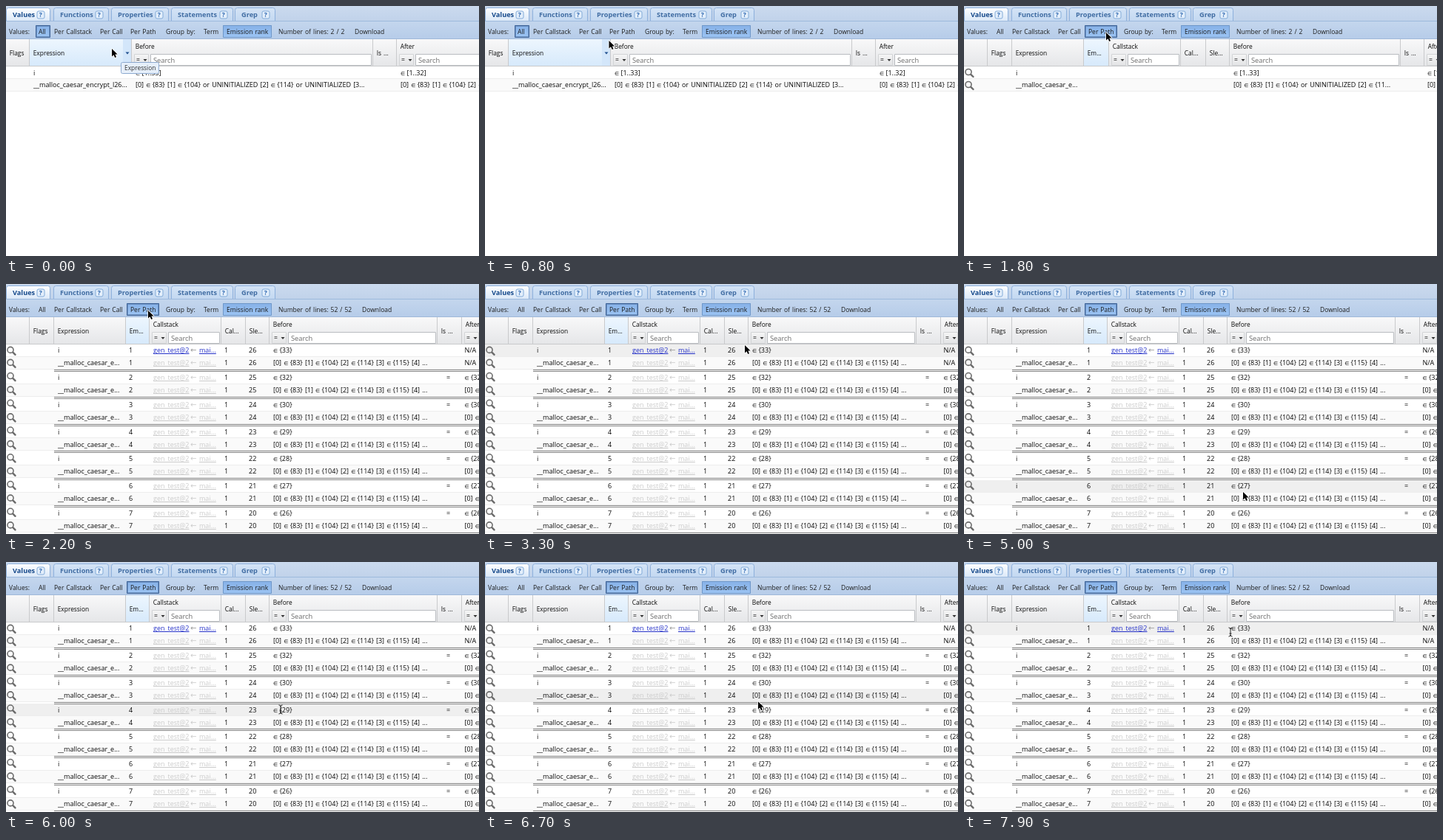
These frames come from a looping animation (639x339 px, 8000 ms). An HTML page with a canvas:

```html
<!DOCTYPE html>
<html lang="en">
<head>
<meta charset="utf-8">
<title>Values table</title>
<style>
html, body { margin: 0; width: 100%; height: 100%; overflow: hidden; background: #fff; }
canvas { display: block; }
</style>
</head>
<body>
<canvas id="stage" width="639" height="339"></canvas>
<script>
const W = 639, H = 339, LOOP = 8000;
const SWITCH = 1400, LOADED = 2000;
const ctx = document.getElementById('stage').getContext('2d');
const SANS = '"Open Sans", "Noto Sans", sans-serif';
const SYMBOLS = { '∈': 7, '←': 10 };

// Columns: left edge, label, has a filter field
const START = [[0, 'Flags'], [32, 'Expression'], [170, 'Before', 1], [496, 'Is ...'], [528, 'After', 1]];
const WAITING = [[0, ''], [32, 'Flags'], [65, 'Expression'], [162, 'Em...'], [196, 'Callstack', 1],
  [293, 'Cal...'], [327, 'Sle...'], [359, 'Before', 1], [590, 'Is ...'], [622, 'After', 1]];
const FULL = [[0, ''], [32, 'Flags'], [65, 'Expression'], [162, 'Em...'], [194, 'Callstack', 1],
  [291, 'Cal...'], [324, 'Sle...'], [356, 'Before', 1], [583, 'Is ...'], [616, 'After', 1]];

// Tabs: label, text x, centre of the help icon
const TABS = [['Values', 9, 47], ['Functions', 73, 126], ['Properties', 151, 207], ['Statements', 232, 294],
  ['Grep', 318, 351]];
const VALUES = [33, 32, 30, 29, 28, 27, 26];
const PITCH = 36.75;
const BYTES = '[0] ∈ {83} [1] ∈ {104} [2] ∈ {114} [3] ∈ {115} [4] ...';

// Pointer path: time, x, y
const PATH = [[0, 143, 58], [400, 143, 58], [1200, 192, 36], [2500, 192, 36], [3200, 351, 83], [3400, 351, 83],
  [4800, 377, 282], [5100, 377, 282], [5900, 371, 200], [6300, 371, 200], [7200, 366, 174],
  [7800, 360, 95], [8000, 360, 95]];

function pointer(t) {
  const i = PATH.findIndex(p => p[0] > t);
  const [t0, x0, y0] = PATH[i - 1], [t1, x1, y1] = PATH[i];
  const u = (t - t0) / (t1 - t0), k = u * u * (3 - 2 * u);
  return [x0 + (x1 - x0) * k, y0 + (y1 - y0) * k];
}

function rect(x, y, w, h, fill, stroke) {
  if (fill) { ctx.fillStyle = fill; ctx.fillRect(x, y, w, h); }
  if (stroke) { ctx.strokeStyle = stroke; ctx.lineWidth = 1; ctx.strokeRect(x + .5, y + .5, w - 1, h - 1); }
}

function rounded(x, y, w, h, r, fill, stroke) {
  ctx.beginPath();
  ctx.roundRect(x, y, w, h, r);
  ctx.fillStyle = fill;
  ctx.fill();
  ctx.strokeStyle = stroke;
  ctx.lineWidth = 1;
  ctx.stroke();
}

function shade(y, h, top, bottom) {
  const g = ctx.createLinearGradient(0, y, 0, y + h);
  g.addColorStop(0, top);
  g.addColorStop(1, bottom);
  return g;
}

// Text centred on y; symbols have their own font size. Returns the end x.
function text(s, x, y, size = 9, color = '#0a0a0a', weight = 500) {
  ctx.fillStyle = color;
  ctx.wordSpacing = '0.8px';
  for (const part of s.split(/([∈←])/)) {
    const symbol = SYMBOLS[part];
    ctx.font = symbol ? `${symbol}px "DejaVu Sans", sans-serif` : `${weight} ${size}px ${SANS}`;
    ctx.fillText(part, x, Math.round(y + 3));
    x += ctx.measureText(part).width;
  }
  return x;
}

function triangle(x, y, color = '#333') {
  ctx.fillStyle = color;
  ctx.beginPath();
  ctx.moveTo(x - 2.5, y - 1);
  ctx.lineTo(x + 2.5, y - 1);
  ctx.lineTo(x, y + 2);
  ctx.fill();
}

function tabs() {
  rect(0, 0, W, 21, shade(0, 21, '#cbdaee', '#c0d2ea'));
  TABS.forEach(([name, x, icon], i) => {
    const fill = i ? shade(2, 18, '#d5e4f6', '#c3d8f1') : shade(2, 18, '#ffffff', '#dce9f8');
    rounded(x - 8.5, 2.5, icon - x + 21, 20, [3, 3, 0, 0], fill, '#8db0dc');
    text(name, x, 12, 9.2, i ? '#416da3' : '#15498b', 700);
    rounded(icon - 5, 7, 10, 10, 2, '#e4effb', '#82abd8');
    text('?', icon - 2.3, 12, 8.5, '#2c66b0', 700);
  });
}

function button(x, w, focused) {
  rect(x, 26, w, 17, shade(26, 17, '#86b1e8', '#9cc4f3'), focused ? '#3f6499' : '#6f97c8');
  if (focused) {
    ctx.setLineDash([1, 1]);
    rect(x + 1, 27, w - 2, 15, null, '#4a6a97');
    ctx.setLineDash([]);
  }
}

function toolbar(t) {
  rect(0, 20, W, 25, shade(20, 25, '#c4d6ed', '#b6cce9'));
  rect(0, 20, W, 1, '#9dbadd');
  rect(0, 44, W, 1, '#9fb8d9');
  if (t < SWITCH) button(40, 20, true); else button(163, 44, true);
  button(293, 66);
  const count = t < LOADED ? 2 : 52;
  const labels = [['Values:', 4], ['All', 44], ['Per Callstack', 65], ['Per Call', 127], ['Per Path', 168],
    ['Group by:', 216], ['Term', 267], ['Emission rank', 298], [`Number of lines: ${count} / ${count}`, 368],
    ['Download', t < LOADED ? 471 : 481]];
  for (const [s, x] of labels) text(s, x, 34.5, 8.5, '#1c1c1c');
}

function header(cols, lit) {
  rect(0, 45, W, 37, shade(45, 37, '#f8f8f9', '#e5e6e8'));
  cols.forEach(([x, label, filter], i) => {
    const next = i + 1 < cols.length ? cols[i + 1][0] : 780;
    if (label === lit) rect(x, 45, next - x, 37, shade(45, 37, '#edf6fe', '#d6e9fb'));
    text(label, x + 4.7, filter ? 54.5 : 63.5, 8.4);
    if (filter) {
      rect(x + 3, 65, 20, 16, shade(65, 16, '#f6f6f6', '#e2e3e5'), '#d2d4d6');
      text('=', x + 6, 73, 8.6);
      triangle(x + 18, 73);
      rect(x + 25, 65, next - x - 27, 16, '#fff', '#b9bcc0');
      text('Search', x + 29, 73.5, 9.3, '#6a6a6a');
    }
    rect(next - 1, 45, 1, 37, '#c9cacc');
  });
  rect(0, 81, W, 1, '#c9cacc');
}

function magnifier(y) {
  ctx.strokeStyle = '#6b6b6b';
  ctx.lineCap = 'round';
  ctx.lineWidth = 1.6;
  ctx.beginPath();
  ctx.arc(6, y - 1, 4, 0, 7);
  ctx.stroke();
  ctx.lineWidth = 2.4;
  ctx.beginPath();
  ctx.moveTo(9.3, y + 2.3);
  ctx.lineTo(12.5, y + 5.5);
  ctx.stroke();
  ctx.lineCap = 'butt';
}

function rowBack(top, odd, hovered) {
  const y = Math.round(top), h = Math.round(top + 17) - y;
  rect(0, y, W, h, hovered ? '#efefef' : odd ? '#fafafa' : '#fff');
  rect(0, y + h - 1, W, 1, '#ededed');
}

function shortRows(before) {
  rowBack(82, false, false);
  rowBack(99, true, false);
  if (before) {
    text('i', 37, 90.5);
    text('__malloc_caesar_encrypt_l26...', 37, 107);
    text('∈ [1..33]', 175, 90.5);
    text('[0] ∈ {83} [1] ∈ {104} or UNINITIALIZED [2] ∈ {114} or UNINITIALIZED [3...', 175, 107);
    text('∈ [1..32]', 533, 90.5);
    text('[0] ∈ {83} [1] ∈ {104} [2] ∈ {114}', 533, 107);
  } else {
    magnifier(90.5);
    magnifier(107.5);
    text('i', 70, 90.5);
    text('__malloc_caesar_e...', 70, 107);
    text('∈ [1..33]', 364, 90.5);
    text('[0] ∈ {83} [1] ∈ {104} or UNINITIALIZED [2] ∈ {11...', 364, 107);
    text('∈ [1..32]', 626, 90.5);
    text('[0] ∈ {83}', 626, 107);
  }
}

function link(s, x, y, color) {
  const end = text(s, x, y, 9, color);
  rect(x, Math.round(y + 4), end - x, 1, color);
}

function fullRows(my) {
  VALUES.forEach((value, k) => {
    for (let odd = 0; odd < 2; odd++) {
      const top = 82 + k * PITCH + odd * 17, y = top + 8.4;
      const first = !k && !odd;
      rowBack(top, odd, my >= top && my < top + 17);
      // The icon cell also spans the separator above it
      magnifier(k && !odd ? y - 1.6 : y);
      text(odd ? '__malloc_caesar_e...' : 'i', 70, y);
      text(String(k + 1), 166, y);
      const color = first ? '#2430c8' : '#cbcbcb';
      link('gen_test@2', 199, y, color);
      text('←', 249, y, 9, first ? '#999' : '#cbcbcb');
      link('mai...', 261, y, color);
      text('1', 295, y);
      text(String(26 - k), 328, y);
      const set = odd ? BYTES : `∈ {${value}}`;
      text(set, 361, y);
      if (k && !odd) text('=', 595, y);
      text(k ? set : 'N/A', 619.5, y);
    }
  });
  VALUES.forEach((_, k) => {
    const line = Math.round(116 + k * PITCH);
    rect(65, line, W, 3, '#fff');
    rect(65, line, W, 1, '#858585');
    rect(65, line + 2, W, 1, '#858585');
  });
}

function arrow(x, y) {
  ctx.beginPath();
  [[0, 0], [0, 10.5], [2.5, 8.3], [4.2, 12], [6, 11.2], [4.4, 7.6], [7.6, 7.4]].forEach(([dx, dy]) => ctx.lineTo(x + dx, y + dy));
  ctx.closePath();
  ctx.lineJoin = 'round';
  ctx.lineWidth = 1.6;
  ctx.strokeStyle = '#fff';
  ctx.stroke();
  ctx.fillStyle = '#000';
  ctx.fill();
}

function beam(x, y) {
  ctx.lineWidth = .9;
  ctx.strokeStyle = '#111';
  ctx.beginPath();
  for (const s of [-1, 1]) {
    ctx.moveTo(x - 2.5, y + s * 6);
    ctx.quadraticCurveTo(x, y + s * 6, x, y + s * 4);
    ctx.quadraticCurveTo(x, y + s * 6, x + 2.5, y + s * 6);
  }
  ctx.moveTo(x, y - 5);
  ctx.lineTo(x, y + 5);
  ctx.moveTo(x - 1.5, y + 2);
  ctx.lineTo(x + 1.5, y + 2);
  ctx.stroke();
}

function overText(x, y) {
  const offset = (y - 82) % PITCH;
  return x > 358 && y > 82 && (Math.abs(offset - 8.4) < 6 || Math.abs(offset - 25.4) < 6);
}

function draw(t) {
  const [mx, my] = pointer(t);
  rect(0, 0, W, H, '#fff');
  tabs();
  toolbar(t);
  if (t < SWITCH) {
    const hovered = my > 45 && mx < 170;
    header(START, hovered ? 'Expression' : null);
    if (hovered) {
      rect(158, 45, 11, 36, '#d3e6fa');
      triangle(164, 63.5, '#1f4f8f');
    }
    shortRows(true);
  } else if (t < LOADED) {
    header(WAITING, 'Em...');
    shortRows(false);
  } else {
    header(FULL, 'Em...');
    fullRows(my);
  }
  if (t < 500) {
    rounded(155.5, 76.5, 51, 15, 2, '#e6effa', '#8ca9cf');
    text('Expression', 160, 84, 8.4, '#333');
  }
  if (t >= LOADED && overText(mx, my)) beam(mx, my); else arrow(mx, my);
}

function tick() {
  draw(Math.floor(performance.now() % LOOP / 100) * 100);
  requestAnimationFrame(tick);
}
tick();
</script>
</body>
</html>
```
